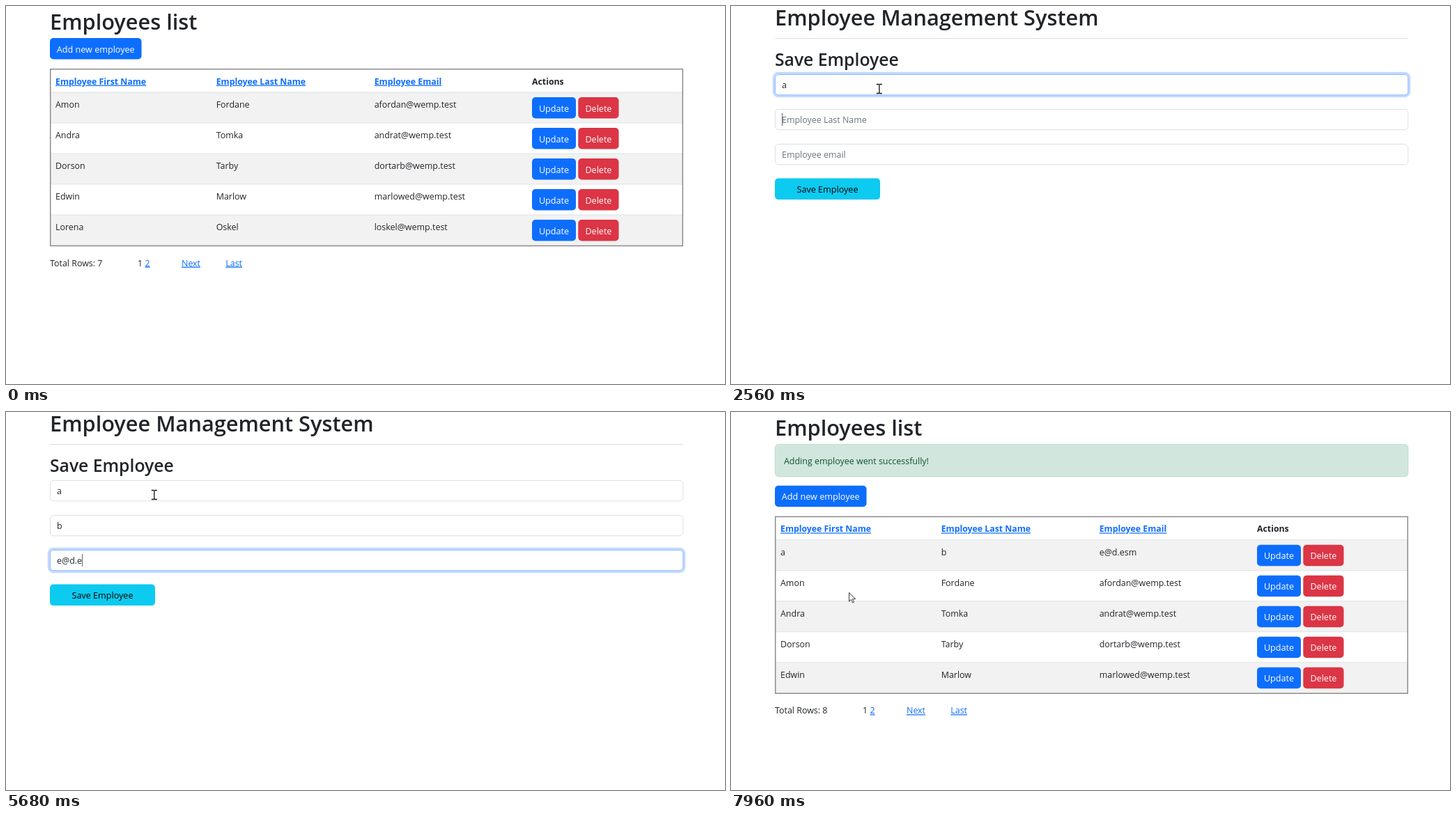
Recreate the animation shown at these times as an HTML page. Size 1032 px wide and 543 px high, loop 8 s.

```html
<!DOCTYPE html>
<html lang="en">
<head>
<meta charset="utf-8">
<title>Employees</title>
<style>
  html, body { margin: 0; width: 100%; height: 100%; overflow: hidden; background: #fff; }
  svg { display: block; width: 100%; height: 100%; }
  text { font: 12.45px "Open Sans", "Noto Sans", sans-serif; fill: #212529; }
  .h1 { font-size: 30.72px; font-weight: 600; }
  .h2 { font-size: 24.7px; font-weight: 600; }
  .th { font-size: 12.3px; font-weight: 700; }
  .link { fill: #0d6efd; text-decoration: underline; }
  .hint { fill: #6c757d; }
  .ok { fill: #0f5132; }
  .light { fill: #fff; }
  .dark { fill: #000; }
  .mid { text-anchor: middle; font-size: 12.6px; }
</style>
</head>
<body>
<svg id="stage" viewBox="0 0 1032 543"></svg>
<script>
const LOOP = 8000, TICK = 60;
const FORM_AT = 1000, BEAM_AT = 1060, PRESS_AT = 7480, SAVED_AT = 7720, BACK_AT = 7960;
const stage = document.getElementById('stage');
const pen = document.createElement('canvas').getContext('2d');
pen.font = '12.45px "Open Sans", "Noto Sans", sans-serif';

const people = [
  ['Amon', 'Fordane', 'afordan@wemp.test'],
  ['Andra', 'Tomka', 'andrat@wemp.test'],
  ['Dorson', 'Tarby', 'dortarb@wemp.test'],
  ['Edwin', 'Marlow', 'marlowed@wemp.test'],
  ['Lorena', 'Oskel', 'loskel@wemp.test'],
];
const added = ['a', 'b', 'e@d.esm'];
const columns = [71, 301.7, 528.7];

// Each field: hint, key times, glow start and end
const fields = [
  { hint: 'Employee First Name', keys: [2020], on: 1480, off: 2740 },
  { hint: 'Employee Last Name', keys: [3760], on: 2740, off: 4060 },
  { hint: 'Employee email', keys: [4240, 4600, 5080, 5380, 5680, 5980, 6100], on: 4060, off: PRESS_AT },
];
// Caret spans: field, from, to
const carets = [[0, 1480, 2560], [1, 2560, 3280], [1, 3760, 3880], [2, 3880, PRESS_AT]];

// Pointer path: time, x, y
const path = [
  [220, 1020, 41], [340, 930, 44], [580, 270, 66], [760, 169, 70], [1060, 169, 75],
  [1120, 185, 95], [1180, 206, 118], [1240, 212.8, 127], [1300, 212.8, 119],
  [6580, 212.8, 119], [6640, 213, 130], [6880, 213, 130], [7060, 204, 170],
  [7240, 181, 237], [7360, 169, 259],
];

const text = (x, y, s, cls = '') => `<text x="${x}" y="${y}" class="${cls}">${s}</text>`;
const rect = (x, y, w, h, fill, extra = '') =>
  `<rect x="${x}" y="${y}" width="${w}" height="${h}" fill="${fill}" ${extra}/>`;
const line = (x1, y1, x2, y2, color) =>
  `<path d="M${x1} ${y1}L${x2} ${y2}" stroke="${color}"/>`;
const button = (x, y, w, label, fill, cls = 'light') =>
  rect(x, y, w, 30.5, fill, 'rx="5"') + text(x + w / 2, y + 20.5, label, 'mid ' + cls);

function fade(t, start) {
  if (t < start) return 0;
  const p = Math.min(1, (t - start + 75) / 150);
  return p * p * (3 - 2 * p);
}

function blend(a, b, p) {
  return `rgb(${a.map((v, i) => Math.round(v + (b[i] - v) * p))})`;
}

function pointerAt(t) {
  const i = path.findIndex(k => k[0] > t);
  if (i === 0) return path[0].slice(1);
  if (i < 0) return path[path.length - 1].slice(1);
  const [t0, x0, y0] = path[i - 1], [t1, x1, y1] = path[i];
  const p = (t - t0) / (t1 - t0);
  return [x0 + (x1 - x0) * p, y0 + (y1 - y0) * p];
}

function listPage(rows, total, dy, addFill) {
  let s = button(63, 46 + dy, 131.5, 'Add new employee', addFill);
  ['Employee First Name', 'Employee Last Name', 'Employee Email'].forEach((h, i) => {
    s += text(columns[i], 112.7 + dy, h, 'th link');
  });
  s += text(755, 112.7 + dy, 'Actions', 'th');
  rows.forEach((row, r) => {
    const y = 124 + dy + r * 44;
    s += rect(64, y, 907, 44, r % 2 ? '#fff' : '#f2f2f2') + line(64, y, 971, y, '#dee2e6');
    row.forEach((cell, i) => { s += text(columns[i], y + 22.2, cell); });
    s += button(755, y + 7, 63, 'Update', '#0d6efd') + button(821.3, y + 7, 58.2, 'Delete', '#dc3545');
  });
  s += rect(63.7, 90.7 + dy, 907.6, 253.8, 'none', 'stroke="#8b8b8b" stroke-width="1.5"');
  const y = 373.6 + dy;
  return text(63, 33.7, 'Employees list', 'h1') + s +
    text(63, y, 'Total Rows: ' + total) + text(189, y, '1') + text(199.5, y, '2', 'link') +
    text(252, y, 'Next', 'link') + text(315.3, y, 'Last', 'link');
}

function formPage(t) {
  let s = text(63, 27.5, 'Employee Management System', 'h1') + line(63, 46.5, 972, 46.5, '#dcddde') +
    text(63, 85.7, 'Save Employee', 'h2');
  fields.forEach((f, i) => {
    const y = 98 + i * 50;
    const glow = fade(t, f.on) - fade(t, f.off);
    const value = added[i].slice(0, f.keys.filter(k => t >= k).length);
    if (glow > 0) {
      s += rect(61.4, y - 1.6, 912.2, 33.2, 'none',
        `rx="6.5" stroke="#0d6efd" stroke-width="3.3" stroke-opacity="${0.25 * glow * glow}"`);
    }
    s += rect(63.4, y + 0.4, 908.4, 29.4, '#fff',
      `rx="5" stroke="${blend([218, 222, 227], [134, 183, 254], glow)}"`);
    s += value ? text(73, y + 20.3, value) : text(73, y + 20.3, f.hint, 'hint');
    if (carets.some(([n, from, to]) => n === i && t >= from && t < to)) {
      s += rect(Math.round(73 + pen.measureText(value).width), y + 6, 1, 18, '#666');
    }
  });
  const pressed = fade(t, PRESS_AT);
  if (pressed > 0) {
    s += rect(61.4, 246, 154.2, 33.7, 'none',
      `rx="6.5" stroke="#0baccc" stroke-width="3.3" stroke-opacity="${0.5 * pressed}"`);
  }
  const fill = blend([13, 202, 240], [61, 213, 243], 0.75 * fade(t, 7360) + 0.25 * pressed);
  return s + button(63, 247.6, 151, 'Save Employee', fill, 'dark');
}

const shapes = {
  arrow: '<path d="M.5 .5V13l3-2.7 2 4.5 2-.9-2-4.3h4z" fill="#fff" stroke="#222" stroke-width=".9"/>',
  beam: '<path d="M-4-6.5h3l1 .7 1-.7h3M-4 6.5h3l1-.7 1 .7h3M0-6V6" fill="none" stroke="#111" stroke-width="1.3"/>',
  hand: '<path d="M-1.5 1.5q1.5-2 3 0V7l6 1.5q2 .7 2 2.5l-1 5.5H0L-4.5 10.5q0-2 3 .5z" fill="#fff" stroke="#222" stroke-width=".9"/>',
};

function pointer(t) {
  const hidden = t < 100 || (t >= FORM_AT && t < BEAM_AT) || (t >= SAVED_AT && t < BACK_AT);
  if (hidden) return '';
  const [x, y] = pointerAt(t);
  let shape = 'arrow';
  if (t < FORM_AT) {
    if (x < 194) shape = 'hand';
  } else if (t < SAVED_AT) {
    const inField = y >= 98 && y < 228 && (y - 98) % 50 < 30;
    if (t < 6640 || inField) shape = 'beam';
    else if (y > 247) shape = 'hand';
  }
  return `<g transform="translate(${x} ${y})">${shapes[shape]}</g>`;
}

function draw(t) {
  let page;
  if (t < FORM_AT) {
    const tone = 0.75 * fade(t, 700) + 0.25 * fade(t, 880);
    page = listPage(people, 7, 0, blend([13, 110, 253], [10, 88, 202], tone));
  } else if (t < SAVED_AT) {
    page = formPage(t);
  } else {
    page = rect(63.4, 46.4, 908.4, 46.4, '#d1e7dd', 'rx="5" stroke="#badbcc"') +
      text(76, 74.9, 'Adding employee went successfully!', 'ok') +
      listPage([added, ...people.slice(0, 4)], 8, 59.7, '#0d6efd');
  }
  stage.innerHTML = page + pointer(t);
}

let last = -1;
function frame() {
  const now = performance.now() % LOOP;
  const t = now < 100 ? 0 : 100 + TICK * Math.floor((now - 100) / TICK);
  if (t !== last) draw(last = t);
  requestAnimationFrame(frame);
}
frame();
</script>
</body>
</html>
```
